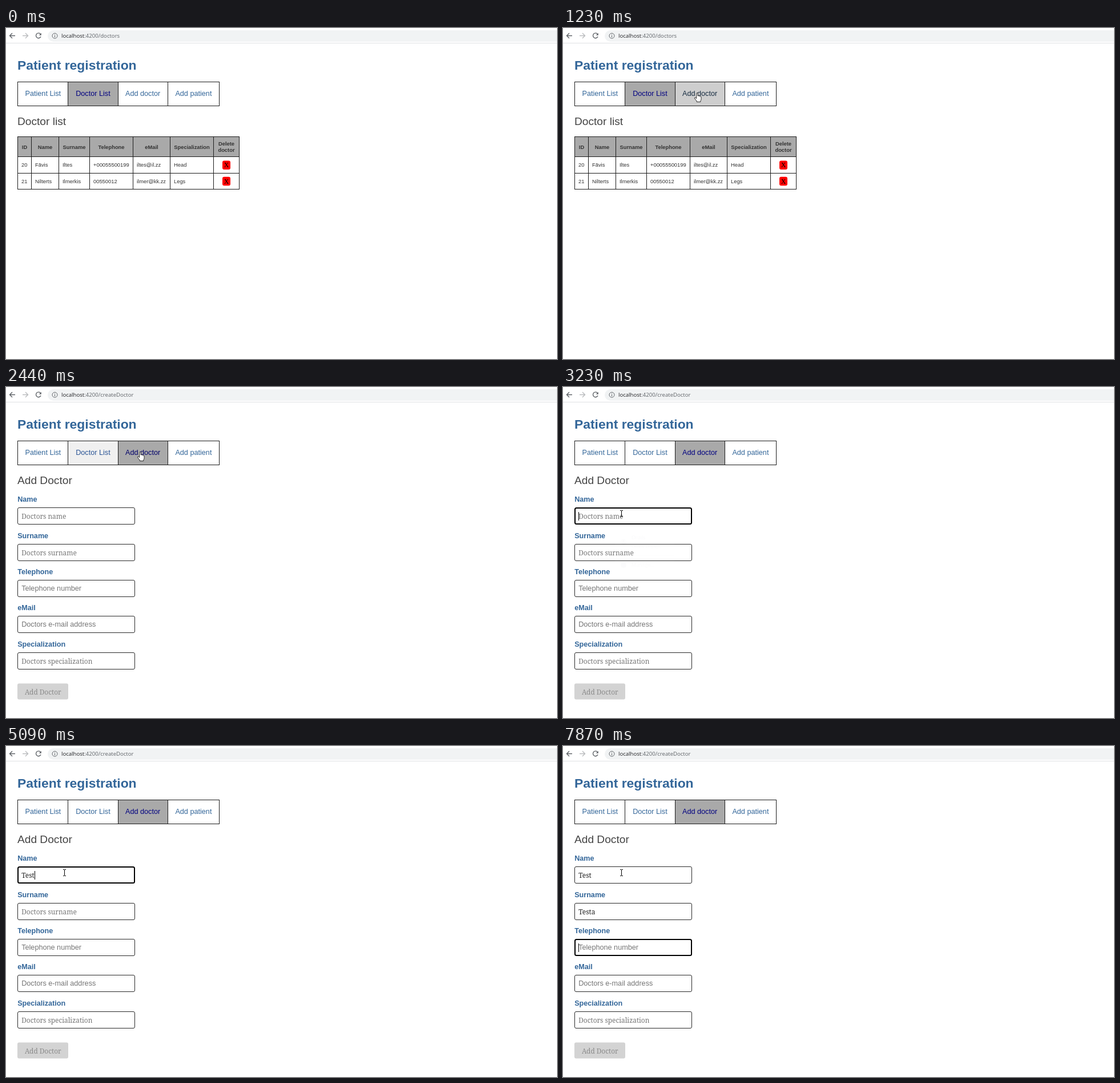
Recreate the animation shown at these times as an HTML page. Size 965 px wide and 580 px high, loop 8000 ms.

```html
<!DOCTYPE html>
<html lang="en">
<head>
<meta charset="utf-8">
<title>Patient registration</title>
<style>
html, body { margin: 0; width: 100%; height: 100%; overflow: hidden; background: #fff; }
svg { display: block; }
text { font-family: "Liberation Sans", Arial, sans-serif; white-space: pre; }
.ui { font-family: "Open Sans", sans-serif; }
.serif { font-family: "Noto Serif", serif; font-size: 11.85px; }
.bold { font-weight: bold; }
.mid { text-anchor: middle; }
.nav, .sans { font-size: 12.67px; }
.label { font-size: 12.6px; }
.cell { font-size: 9.36px; fill: #333; }
.line { stroke: #1c1c1c; fill: none; shape-rendering: crispEdges; }
.h2 { font-size: 19.15px; fill: #444; }
</style>
</head>
<body>
<svg id="stage" width="965" height="580" viewBox="0 0 965 580"></svg>
<script>
const LOOP = 8000, SWITCH = 2150, BLINK = 530;
const BLUE = [51, 102, 153], NAVY = [0, 0, 128], BLACK = [0, 0, 0], WHITE = [255, 255, 255], GRAY = [169, 169, 169];
const $ = id => document.getElementById(id);
const text = (x, y, s, cls = "", more = "") => `<text x="${x}" y="${y}" class="${cls}" ${more}>${s}</text>`;
const rect = (x, y, w, h, more) => `<rect x="${x}" y="${y}" width="${w}" height="${h}" ${more}/>`;
const lines = d => `<path class="line" d="${d}"/>`;

function toolbar() {
  return `<g fill="none" stroke="#5f6368" stroke-width="1.4">
    <path d="M16 13.5H7M11 9L6.5 13.5L11 18"/>
    <path d="M29 13.5H38M34 9L38.5 13.5L34 18" stroke="#babcbe"/>
    <path d="M60.5 10.7A4.4 4.4 0 1 0 61 15"/><path d="M61.8 8.8V12.8H57.8Z" fill="#5f6368" stroke="none"/></g>`
    + rect(73, 4, 910, 20, 'rx="10" fill="#f1f3f4"')
    + `<g fill="none" stroke="#5f6368"><circle cx="85.5" cy="13.7" r="4.5"/><path d="M85.5 13V16.3M85.5 11V12.1"/></g>`
    + `<text x="97" y="17" class="ui" font-size="9.6" fill="#202124">localhost<tspan fill="#5f6368">:4200/<tspan id="path"></tspan></tspan></text>`
    + rect(0, 26, 965, 1, 'fill="#dfe1e3"');
}

const navX = [20.5, 108.5, 196.5, 283.5, 373.5];
function nav() {
  const names = ["Patient List", "Doctor List", "Add doctor", "Add patient"];
  const textX = [33.5, 122.2, 209, 296.4];
  return names.map((s, i) => rect(navX[i], 94.5, navX[i + 1] - navX[i], 42, `id="bg${i}" class="line" style="fill:#fff"`)
    + text(textX[i], 119.2, s, "nav", `id="link${i}" fill="#369"`)).join("");
}

function doctorTable() {
  const xs = [20.5, 44.5, 92.5, 146.5, 222.5, 287.5, 363.5, 408.5], ys = [190.5, 225.5, 254.5, 282.5];
  const heads = ["ID", "Name", "Surname", "Telephone", "eMail", "Specialization"];
  const rows = [
    ["20", "Fāvis", "Iltes", "+00055500199", "iltes@il.zz", "Head"],
    ["21", "Nilterts", "Ilmerkis", "00550012", "ilmer@kk.zz", "Legs"]];
  let s = text(20, 169.7, "Doctor list", "h2") + rect(20, 190, 389, 36, 'fill="#a9a9a9"');
  s += lines(xs.map(x => `M${x} 190V283`).join("") + ys.map(y => `M20 ${y}H409`).join(""));
  heads.forEach((h, i) => s += text((xs[i] + xs[i + 1]) / 2, 212, h, "cell bold mid"));
  s += text(386, 206, "Delete", "cell bold mid") + text(386, 217, "doctor", "cell bold mid");
  rows.forEach((row, r) => {
    const y = 243.4 + 28.3 * r;
    row.forEach((v, i) => s += text(xs[i] + 6.5, y, v, "cell"));
    s += rect(379, y - 11, 14, 15.5, 'rx="3" fill="#f00"')
      + text(386, y + 1, "X", "mid", 'style="font:12px \'Liberation Serif\',serif"');
  });
  return s;
}

const fields = [["Name", "Doctors name"], ["Surname", "Doctors surname"], ["Telephone", "Telephone number"],
  ["eMail", "Doctors e-mail address"], ["Specialization", "Doctors specialization"]];
const fieldY = i => Math.round(211.4 + 63.35 * i);

// The border grows inwards, so the outer edge stays in place
function frame(box, y, width, color) {
  const attrs = { x: 20 + width / 2, y: y + width / 2, width: 206 - width, height: 30 - width, "stroke-width": width, stroke: color };
  for (const name in attrs) box.setAttribute(name, attrs[name]);
}

function form() {
  let s = text(20, 169.7, "Add Doctor", "h2");
  fields.forEach(([label], i) => {
    const y = fieldY(i), sans = i == 2 || i == 3;
    s += text(20.2, y - 9.7, label, "label bold", 'fill="#369"')
      + `<rect id="box${i}" rx="2.5" fill="#fff"/>`
      + text(27.2, y + (sans ? 19 : 20), "", sans ? "sans" : "serif", `id="input${i}"`);
  });
  return s + rect(20, 519.5, 89, 28, 'rx="3" fill="#d3d3d3"')
    + text(33, 538.5, "Add Doctor", "serif", 'fill="#8a8a8a"')
    + rect(0, 0, 1, 15, 'id="caret" fill="#000"');
}

function popup() {
  return `<g id="popup"><path d="M91 247H101L106 242.5L111 247H195V327H91Z" fill="#fff" style="filter:drop-shadow(0 1px 1.5px #0005)"/>
    <g fill="none" stroke="#5f6368"><circle cx="106" cy="271.5" r="4.5"/><circle cx="106" cy="270" r="1.5" fill="#5f6368"/>
    <path d="M102.7 274.5Q106 271.8 109.3 274.5" stroke-width="1.5"/></g>
    <circle cx="106" cy="312" r="5" fill="#5f6368"/>`
    + text(120, 267, "Ordils", "ui", 'font-size="8.8" fill="#303236"')
    + text(120, 282, "Ordils Zēlpiņš", "ui", 'font-size="8" fill="#5f6368"')
    + rect(91, 295, 104, 1, 'fill="#e4e4e4"')
    + text(120, 315, "Manage...", "ui", 'font-size="8.8" fill="#5f6368"') + "</g>";
}

const cursors = `<g id="cursor" stroke="#000" stroke-width=".8" fill="#fff" stroke-linejoin="round">
  <path id="arrow" d="M0 0V12L2.8 9.4L4.7 13.8L6.6 13L4.7 8.7H8.6Z"/>
  <path id="hand" d="M-1.2 9.5V.3Q0 -1.2 1.2 .3V5Q2.5 4 3.4 5.4Q4.7 4.6 5.5 6Q7 5.6 7 7.2V10.5Q7 12.5 5.8 13.8V15.5H-.8V14L-4.6 9.3Q-4.7 7.5 -3 7.9Z"/>
  <path id="beam" d="M-2.5 -5.5H-.7L0 -5L.7 -5.5H2.5M0 -5V5M-2.5 5.5H-.7L0 5L.7 5.5H2.5" fill="none" stroke-width="1"/></g>`;

$("stage").innerHTML = toolbar() + text(20, 73, "Patient registration", "bold", 'font-size="22.9" fill="#369"')
  + nav() + `<g id="list">${doctorTable()}</g><g id="form">${form()}${popup()}</g>` + cursors;

const clamp = v => Math.max(0, Math.min(1, v));
const mix = (a, b, k) => a + (b - a) * k;
const blend = (a, b, k) => `rgb(${a.map((v, i) => Math.round(mix(v, b[i], k)))})`;

// The CSS "ease" curve
function ease(p) {
  let lo = 0, hi = 1;
  for (let i = 0; i < 20; i++) {
    const u = (lo + hi) / 2;
    if (.75 * u * (1 - u) + u ** 3 < p) lo = u; else hi = u;
  }
  return .3 * (1 - lo) ** 2 * lo + 3 * (1 - lo) * lo * lo + lo ** 3;
}
const fade = (t, start) => ease(clamp((t - start) / 500));

// time, x, y of the pointer
const route = [[70, 836, 537], [820, 217, 152], [890, 222, 148], [1150, 235, 114],
  [2640, 235, 114], [2840, 125, 478], [3160, 102.5, 222], [LOOP, 102.5, 222]];

// time, focused field, its text
const keys = [[3220, 0, ""], [4280, 0, "T"], [4610, 0, "Te"], [4830, 0, "Tes"], [5090, 0, "Test"],
  [5350, 1, ""], [6140, 1, "T"], [6470, 1, "Te"], [6670, 1, "Tes"], [6880, 1, "Test"], [7410, 1, "Testa"], [7870, 2, ""]];

const show = (id, on) => $(id).style.display = on ? "" : "none";

function drawNav(t) {
  const on = fade(t, 1065), moved = fade(t, SWITCH + 30);
  $("bg1").style.fill = blend(GRAY, WHITE, moved);
  $("link1").style.fill = blend(NAVY, BLUE, moved);
  $("bg2").style.fill = blend(WHITE, GRAY, on);
  $("link2").style.fill = moved ? blend(BLACK, NAVY, moved) : blend(BLUE, BLACK, on);
}

function drawForm(t) {
  const past = keys.filter(k => k[0] <= t), last = past[past.length - 1];
  fields.forEach(([, hint], i) => {
    const typed = past.filter(k => k[1] == i).pop(), value = typed ? typed[2] : "";
    const focus = last && last[1] == i, y = fieldY(i);
    $("input" + i).textContent = value || hint;
    $("input" + i).style.fill = value ? "#222" : "#757575";
    frame($("box" + i), y, focus ? 2 : 1, focus ? "#000" : "#2a2a2a");
    if (focus) {
      const x = 27 + (value ? $("input" + i).getComputedTextLength() : 0);
      $("caret").setAttribute("transform", `translate(${Math.round(x)} ${y + 8})`);
    }
  });
  show("caret", last && Math.floor((t - last[0]) / BLINK) % 2 == 0);
  $("popup").style.opacity = t < 4000 ? clamp((t - 3230) / 70) : clamp(1 - (t - 4250) / 210);
}

function drawCursor(t) {
  show("cursor", t >= 70);
  if (t < 70) return;
  const i = route.findIndex(p => p[0] > t), a = route[i - 1], b = route[i];
  let k = (t - a[0]) / (b[0] - a[0]);
  k = k * k * (3 - 2 * k);
  const x = mix(a[1], b[1], k), y = mix(a[2], b[2], k);
  const hand = y < 136.5, beam = t > SWITCH && x < 226 && y > 190;
  $("cursor").setAttribute("transform", `translate(${x} ${y})`);
  show("hand", hand);
  show("beam", beam);
  show("arrow", !hand && !beam);
}

function draw(now) {
  const t = now % LOOP, adding = t >= SWITCH;
  $("path").textContent = adding ? "createDoctor" : "doctors";
  show("list", !adding);
  show("form", adding);
  drawNav(t);
  if (adding) drawForm(t);
  drawCursor(t);
}

const start = performance.now();
function tick() {
  draw(performance.now() - start);
  requestAnimationFrame(tick);
}
tick();
</script>
</body>
</html>
```
